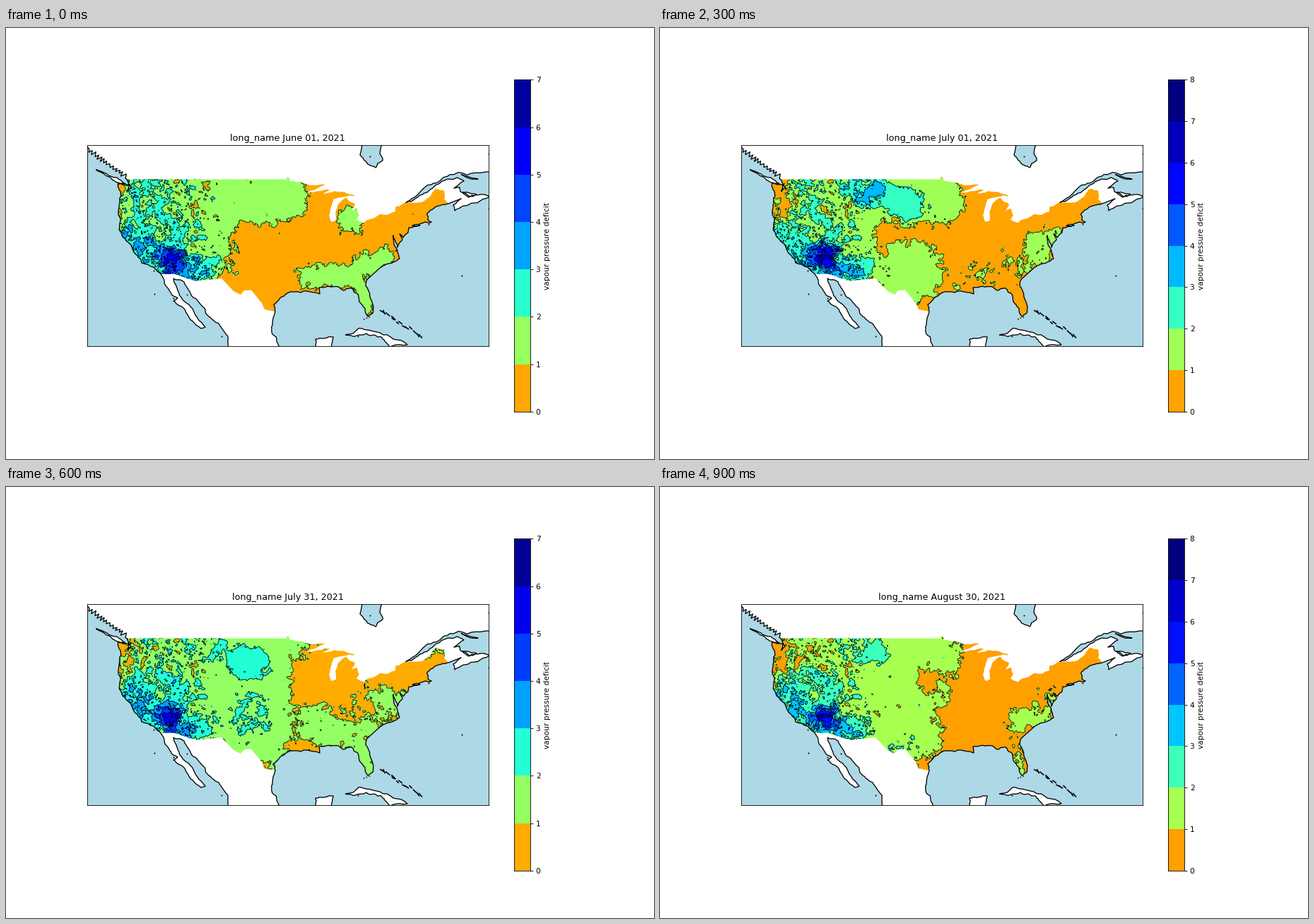
Recreate the animation shown at these times as a matplotlib script. Size 917 px wide and 611 px high, loop 1000 ms.

```python
import numpy as np
import matplotlib.pyplot as plt
from matplotlib.animation import FuncAnimation
from matplotlib.path import Path

W, H, DPI = 917, 611, 72
LEFT, RIGHT, TOP, BOTTOM = 114.6, 683.2, 166.4, 450.7
SCALE = W / 12 / DPI  # text and lines are sized for a figure 12 inches wide
rng = np.random.default_rng(11)


# ---- coastlines: key points in stage pixels, roughened ----
def line(*flat):
    return np.array(flat, float).reshape(-1, 2)


def coast(*flat, rounds=3, amount=.06):
    """Shift the midpoint of each segment sideways, again and again."""
    points = line(*flat)
    for _ in range(rounds):
        step = np.diff(points, axis=0)
        normal = step[:, ::-1] * (-1, 1)
        mid = points[:-1] + step / 2 + normal * rng.normal(0, amount, (len(step), 1))
        points = np.vstack([np.stack([points[:-1], mid], 1).reshape(-1, 2), points[-1:]])
    return points


def fjords(start, end, count, depth):
    """Zigzag of inlets between two points."""
    points = np.linspace(start, end, count)
    points[::2] += (depth, -depth)
    return points + rng.normal(0, .8, points.shape)


inlets = fjords((114, 175), (168, 213), 26, 4)
pacific = coast(
    171, 214.5, 177, 226, 172, 231, 174, 222, 158.5, 220, 163, 238, 159, 265, 162, 274,
    160, 285, 166, 297, 175.5, 306, 180.5, 317, 190.5, 327.6, 192, 333, 209, 339, 219, 348.7)
baja = coast(
    223, 355, 231, 372, 243, 383, 237, 387, 253, 399, 260, 412, 276, 426, 282, 424,
    271, 411, 261, 395, 243, 372, 237, 355, 252, 360, 265, 382, 282, 399, 283, 405,
    301, 419, 314, 437, 315, 456)
gulf = coast(
    388, 456, 377, 434, 377, 418, 381, 402, 379, 392, 389, 382, 402, 374, 421, 373,
    444, 377, 443, 368, 470, 366.6, 477, 372, 488, 368.6, 498, 377.6, 500, 388, 512, 409,
    519.5, 403.6, 520, 395, 509, 365.4, 511, 356.5)
atlantic = coast(
    530, 339.4, 541, 334, 557, 327, 553, 313, 548, 294, 554, 311, 561, 300, 557, 292,
    562, 297, 569, 290, 570, 283, 586, 279.7, 575, 280.5, 593, 275, 602, 275, 597, 272,
    596, 263, 607, 254, 626, 249)
maritimes = coast(
    644, 242, 633, 251, 635, 259, 649, 252, 684, 239, 676, 236, 655, 240, 643, 232,
    642, 226, 634, 227, 648, 217, 638, 212, 614, 220, 592, 234, 566, 247.5, 602, 222,
    624, 210.5, 640, 204.5, 690, 205)
south_border = line(
    238, 348.5, 268, 358.7, 305, 355, 322, 373, 332, 378, 337, 372, 347, 371.5,
    362, 390, 366, 399, 381, 402)
great_lakes = coast(
    620, 242, 620, 230, 608, 228, 599, 240, 590, 246, 564, 247.6, 551, 254, 551, 260,
    529, 264, 507, 276, 495, 272, 500, 265, 497, 256, 489, 260, 494, 250, 482, 241,
    470, 250, 467, 273, 461, 275, 457, 265, 463, 243, 494, 238, 480, 233, 449, 235,
    458, 229, 424, 234, 452, 222, 431, 223, 402, 217, 400, 211.5, 397, 211.5, 397, 214.5)

mainland = np.vstack([[(108, 160)], inlets, pacific, baja, gulf, atlantic, maritimes,
                      [(690, 160)]])
gulf_us = gulf[np.argmax(gulf[:, 1] < 402.5):]
country = np.vstack([pacific, south_border, gulf_us, atlantic, great_lakes])
james_bay = coast(503, 160, 501, 180, 510, 190, 523, 198, 526, 192, 533, 188,
                  529, 178, 534, 160)
islands = [
    coast(128, 201, 157, 212, 169, 221, 155, 218, 140, 208, 128, 201),
    coast(481, 435, 500, 425.5, 529, 432, 568, 449, 543, 452, 532, 438.5, 510, 433, 481, 435),
    coast(437, 456, 438, 441, 463, 438, 461, 456),
    coast(645, 208, 668, 214, 652, 212, 645, 208),
    coast(647, 233, 666, 236, 655, 239, 647, 233),
]
islets = line(645, 351, 209.5, 377, 237, 383, 305, 437, 209, 344, 256, 378, 498, 437,
              515, 182, 683, 178, 683, 256, 598, 278)

# ---- vapour pressure field ----
gx, gy = np.meshgrid(np.arange(154, 632), np.arange(207, 414))


def fractal(seed, power, size=25):
    """Unit-variance noise whose largest features span about size pixels."""
    noise = np.fft.fft2(np.random.default_rng(seed).normal(size=gx.shape))
    fx, fy = np.meshgrid(np.fft.fftfreq(gx.shape[1]), np.fft.fftfreq(gx.shape[0]))
    out = np.fft.ifft2(noise / (fx ** 2 + fy ** 2 + size ** -2.) ** (power / 2)).real
    return out / out.std()


# centre and radii of each region
regions = dict(
    west=(230, 285, 80, 95), north_plains=(345, 240, 82, 37),
    central_plains=(355, 290, 48, 28), south_plains=(352, 345, 44, 42),
    pacific_nw=(172, 236, 14, 29), columbia=(205, 243, 26, 27),
    great_basin=(217, 285, 43, 25), idaho=(250, 240, 20, 25),
    montana=(294, 232, 28, 17), dakota=(342, 250, 30, 23), rockies=(315, 305, 8, 38),
    arizona=(262, 342, 38, 15), panhandle=(346, 325, 32, 34), rio_grande=(345, 375, 26, 17),
    lakes=(448, 266, 50, 42), iowa=(378, 275, 18, 17), ozarks=(440, 330, 29, 25),
    south=(462, 350, 46, 17), carolina=(524, 330, 30, 18), virginia=(545, 303, 24, 18),
    ohio=(487, 272, 18, 16), appalachia=(500, 308, 32, 15), northeast=(575, 262, 60, 24),
    florida=(507, 385, 14, 27), gulf_coast=(415, 369, 28, 6),
    valley=(176, 288, 8, 12), sierra=(192, 312, 12, 17), sonora=(256, 346, 18, 7),
    desert=(229, 323, 22, 13), mojave=(237, 330, 13, 14))

terrain = fractal(4, 1.6)
west_side = 1 / (1 + np.exp((gx - 295) / 10))


def field(seed, step, base, hot, peak, **levels):
    """Paint region levels in band units, with frayed edges and rough terrain."""
    wx = gx + 4 * fractal(seed, 1.8)
    wy = gy + 4 * fractal(seed + 50, 1.8)
    levels.update(valley=hot, sierra=hot, sonora=peak - 1.7, desert=peak - 1, mojave=peak)
    value = np.full(gx.shape, base)
    for name, level in levels.items():
        x, y, rx, ry = regions[name]
        dist = (np.abs((wx - x) / rx) ** 3 + np.abs((wy - y) / ry) ** 3) ** (1 / 3)
        edge = np.clip((dist - 1) * min(rx, ry) / 2.5, -30, 30)
        value += (level - value) / (1 + np.exp(edge))
    east_noise = .15 * fractal(seed + 90, 1.6)
    value += np.where(west_side > .5, .42 * terrain * west_side, 0)
    value += np.where(west_side > .5, 0, .42 * terrain * west_side) + (1 - west_side) * east_noise
    return np.maximum(value, .05) * step


june_01 = field(1, 1, .5, 3.5, 5.1, north_plains=1.5, west=1.5, columbia=2.3, great_basin=2.2,
                arizona=2.7, rockies=1.2, south=1.5, carolina=1.4, florida=1.5, ohio=1.4)
june_21 = field(2, 1.5, .5, 2.2, 3.8, west=1.5, idaho=1, montana=1.3, dakota=.8, great_basin=2,
                rockies=1.5, rio_grande=1.5, arizona=2.6, pacific_nw=.5)
july_01 = field(3, 1, .5, 3, 5.7, north_plains=1.5, west=1.5, dakota=2.5, montana=3.3,
                columbia=2.2, great_basin=2.1, pacific_nw=.3, south_plains=1.5, rockies=.7,
                arizona=2.6, virginia=1.4, carolina=1.1, south=.9, gulf_coast=.8)
july_21 = field(5, 1, .5, 3.4, 5.4, north_plains=1.5, central_plains=1.5, south_plains=1.5,
                west=1.5, montana=2.4, dakota=2.4, great_basin=2.4, arizona=2.6,
                pacific_nw=.3, virginia=1.4, ozarks=.95, south=1, florida=1.2, rockies=1.2)
august_10 = field(7, 1, 1.5, 3.6, 5.3, lakes=.5, northeast=.5, dakota=2.5, panhandle=2.5,
                  columbia=2.2, great_basin=2.3, arizona=1.2, appalachia=1.1, virginia=1,
                  gulf_coast=.7, pacific_nw=1.2)
august_20 = field(8, .8, 1.5, 2.6, 4.9, north_plains=.5, idaho=.7, lakes=1.5, iowa=.7,
                  ozarks=.5, northeast=1.1, virginia=.5, appalachia=1, panhandle=2.5,
                  rio_grande=2.4, great_basin=1.9, arizona=2.1, pacific_nw=.3, rockies=1.1)
august_30 = field(9, 1, .5, 3.6, 5.5, west=1.5, north_plains=1.5, central_plains=1.5,
                  south_plains=1.5, iowa=.6, carolina=1.5, florida=1.2, montana=2.3,
                  great_basin=2.4, arizona=2.2, pacific_nw=.3, rio_grande=2, virginia=1)

# date, level step, band count, top of the colour scale, field
frames = [
    ("June 01", 1, 7, 6.92, june_01),
    ("June 11", 1, 7, 6.8, (june_01 + june_21) / 2),
    ("June 21", 1.5, 6, 8.72, june_21),
    ("July 01", 1, 8, 7.25, july_01),
    ("July 11", 1.5, 7, 9.6, (july_01 + july_21) / 2),
    ("July 21", 1, 7, 6.7, july_21),
    ("July 31", 1, 7, 6.8, (july_21 + august_10) / 2),
    ("August 10", 1, 8, 7.87, august_10),
    ("August 20", .8, 7, 5.33, august_20),
    ("August 30", 1, 8, 7.5, august_30),
]

# ---- stage ----
plt.rcParams.update({
    "font.family": "DejaVu Sans", "font.size": 10 * SCALE, "axes.linewidth": .8 * SCALE,
    "axes.titlepad": 6 * SCALE, "axes.labelpad": 4 * SCALE, "ytick.major.size": 3.5 * SCALE,
    "ytick.major.pad": 3.5 * SCALE, "ytick.major.width": .8 * SCALE})
fig = plt.figure(figsize=(W / DPI, H / DPI), dpi=DPI, facecolor="white")


def stage_axes(left, top, right, bottom):
    return fig.add_axes([left / W, 1 - bottom / H, (right - left) / W, (bottom - top) / H])


ax = stage_axes(LEFT, TOP, RIGHT, BOTTOM)
bar_ax = stage_axes(718.8, 73.3, 742.3, 543.8)
ax.set(xlim=(LEFT, RIGHT), ylim=(BOTTOM, TOP), xticks=[], yticks=[], facecolor="lightblue")


def draw_shape(points, color):
    ax.fill(*points.T, color=color, lw=0, zorder=.5)
    ax.plot(*points.T, color="black", lw=1.3, zorder=2.3)


draw_shape(mainland, "white")
draw_shape(james_bay, "lightblue")
for island in islands:
    draw_shape(island, "white")
ax.plot(*islets.T, "o", color="black", ms=2, mew=0, zorder=2.3)
ax.plot([506, 517], [413, 409], color="black", lw=1.5, ls=":", zorder=2.3)

# strings of small islands running south-east
for t in np.linspace(0, 1, 13):
    x, y = 531 + 56 * t + rng.normal(0, 2), 398 + 38 * t ** .85 + rng.normal(0, 2)
    dx, dy = rng.uniform(1, 2.5, 2)
    ax.plot([x - dx, x + dx], [y - dy, y + dy], color="black", lw=1.6, zorder=2.3)

country_path = Path(country)
contours = []


def update(i):
    date, step, bands, peak, values = frames[i]
    levels = np.arange(bands + 1) * step
    colors = plt.cm.jet_r(np.sqrt((levels[:-1] + step / 2) / peak))
    values = np.minimum(values, levels[-1] - .01)

    while contours:
        contours.pop().remove()
    contours.append(ax.contourf(gx, gy, values, levels, colors=colors, zorder=1))
    contours.append(ax.contour(gx, gy, values, levels[1:-1], colors="black",
                               linewidths=.8, zorder=1.5))
    for layer in contours:
        layer.set_clip_path(country_path, ax.transData)
    ax.set_title(f"long_name {date}, 2021")

    bar_ax.clear()
    bar_ax.bar(0, step, 1, bottom=levels[:-1], color=colors, align="edge", lw=0)
    bar_ax.set(xlim=(0, 1), ylim=(0, levels[-1]), xticks=[])
    bar_ax.yaxis.tick_right()
    bar_ax.yaxis.set_label_position("right")
    digits = 0 if step == 1 else 1
    bar_ax.set_yticks(levels, [f"{level:.{digits}f}" for level in levels])
    bar_ax.set_ylabel("vapour pressure deficit")


anim = FuncAnimation(fig, update, frames=len(frames), interval=100, repeat=True,
                     repeat_delay=0, init_func=lambda: update(0), blit=False)
plt.show()
```
